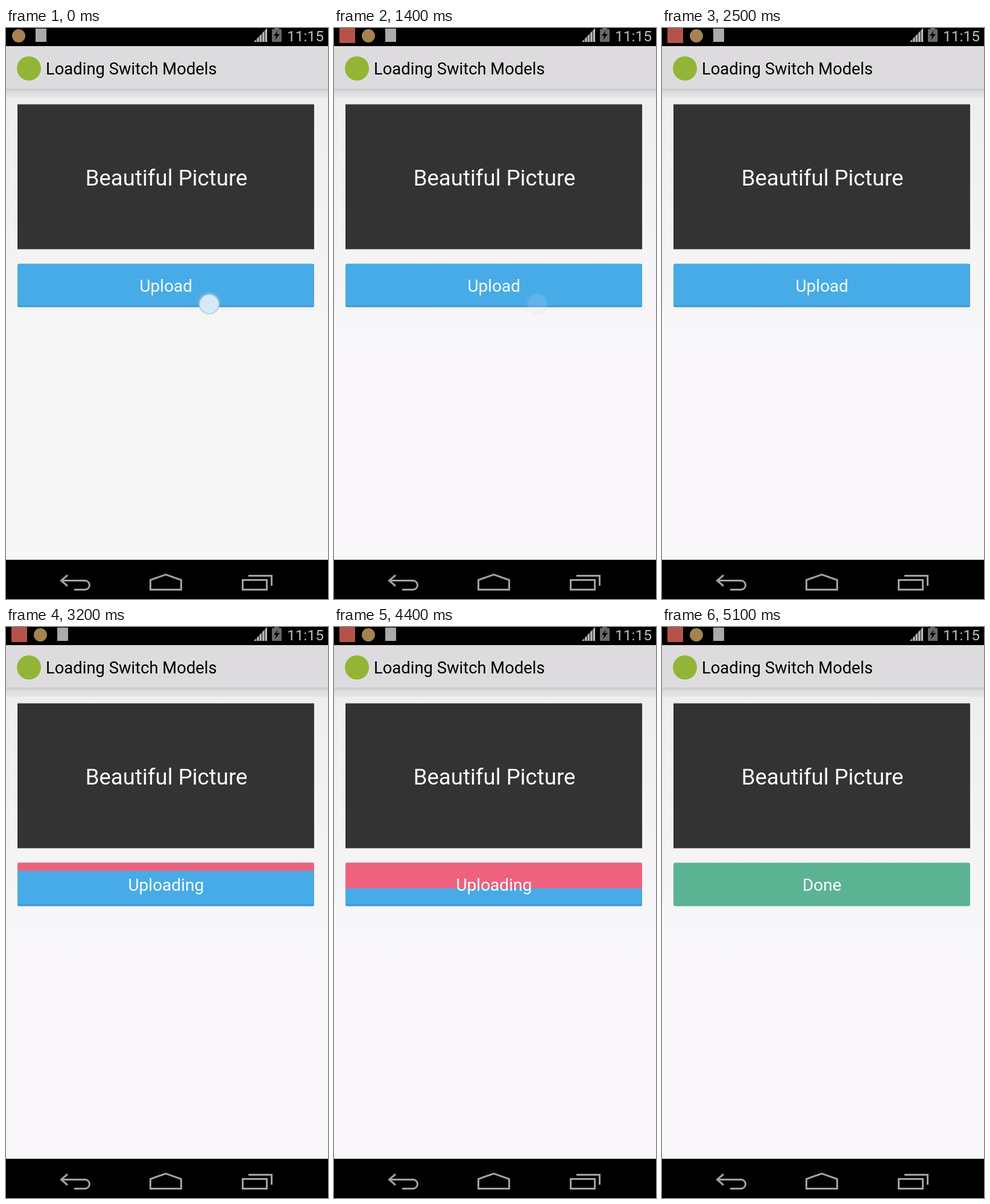
Recreate the animation shown at these times as an HTML page. Size 534 by 946 pixels, loop 6 s.

```html
<!DOCTYPE html>
<html lang="en">
<head>
<meta charset="utf-8">
<title>Upload button</title>
<style>
html, body { margin: 0; width: 100%; height: 100%; overflow: hidden; background: #f7f7f7; }
svg { display: block; width: 100%; height: 100%; }
text { font-family: Roboto, "Noto Sans", sans-serif; }
.nav { fill: none; stroke: #a2a2a2; stroke-width: 3; }
</style>
</head>
<body>
<svg viewBox="0 0 534 946">
  <defs>
    <linearGradient id="shade" x2="0" y2="1">
      <stop offset="0" stop-color="#dbdadc"/>
      <stop offset="1" stop-color="#e8e7e9"/>
    </linearGradient>
    <linearGradient id="haze" x2="0" y2="1">
      <stop offset="0" stop-color="#eeedef"/>
      <stop offset="1" stop-color="#eeedef" stop-opacity="0"/>
    </linearGradient>
    <radialGradient id="glow">
      <stop offset=".78" stop-color="#7fb9e2" stop-opacity=".6"/>
      <stop offset="1" stop-color="#a9cfea" stop-opacity="0"/>
    </radialGradient>
    <clipPath id="round"><rect x="19" y="390.5" width="492" height="72" rx="3"/></clipPath>
  </defs>

  <!-- page and title bar -->
  <rect id="page" y="30" width="534" height="851"/>
  <rect y="115" width="534" height="425" fill="url(#haze)"/>
  <rect id="bar" y="30" width="534" height="70"/>
  <rect y="100" width="534" height="4" fill="#cfced0"/>
  <rect y="104" width="534" height="12" fill="url(#shade)"/>
  <circle cx="38" cy="67" r="20" fill="#93b536"/>
  <text x="66" y="77" font-size="27.4">Loading Switch Models</text>

  <!-- status bar -->
  <rect width="534" height="30"/>
  <rect id="alert" x="9" y="0" width="26" height="25" fill="#b5534a"/>
  <g id="icons">
    <circle cx="21" cy="13" r="11" fill="#a4834e"/>
    <rect x="49" y="1" width="18" height="22" fill="#aaa"/>
  </g>
  <path d="M411 23L433 0V23Z" fill="#b9b9b9"/>
  <path d="M415.500 0V24M420 0V24M424.500 0V24M429 0V24" stroke="#000"/>
  <path d="M445 0h8v2h4v21h-16v-21h4z" fill="#686868"/>
  <path d="M451 4L444 13h4l-2 7 8-10h-5z"/>
  <text x="527" y="21.5" font-size="24.5" text-anchor="end" fill="#bdbdbd">11:15</text>

  <!-- picture -->
  <rect x="19" y="126.5" width="492" height="240" fill="#333"/>
  <text x="266" y="261" font-size="36.6" text-anchor="middle" fill="#f9f9f9">Beautiful Picture</text>

  <!-- button -->
  <g clip-path="url(#round)">
    <rect id="face" x="19" y="390" width="492" height="73"/>
    <rect id="fill" x="19" y="390" width="492" fill="#ee627e"/>
    <rect id="edge" x="19" y="459.5" width="492" height="3" fill="#4398d0"/>
  </g>
  <text id="label" x="265.3" y="437" font-size="28" text-anchor="middle" fill="#f8fbfd"></text>

  <g id="touch">
    <circle cx="337" cy="456" r="20" fill="url(#glow)"/>
    <circle cx="337" cy="457.5" r="16" fill="#d5e9f7" stroke="#b9ccd9" stroke-width="1.5"/>
  </g>

  <!-- navigation bar -->
  <rect y="881" width="534" height="65"/>
  <g class="nav">
    <path d="M102 906.5L91.500 915.500L102 924.500M91.500 915.500H131A7.500 7.500 0 0 1 131 930.500H113"/>
    <path d="M239.500 930.500V914.500L265 905.500L290.500 914.500V930.500Z"/>
    <path d="M392.500 914.500H432.500V930.500H392.500ZM402 907.500H440.500V924"/>
  </g>
</svg>
<script>
const LOOP = 6000;
const FULL = 72;
// [start ms, value]
const progress = [[0, 0], [2900, 10], [3200, 20], [3500, 30], [3700, 40], [4100, 50], [4400, 60], [5000, 80], [5100, 100]];
const touchAlpha = [[0, 1], [1300, .6], [1400, .18], [2300, 0]];

const el = id => document.getElementById(id);
const set = (id, name, value) => el(id).setAttribute(name, value);
const at = (steps, t) => steps.filter(([start]) => start <= t).pop()[1];

function draw(t) {
  const p = at(progress, t);
  const done = p === 100;
  const alerted = t >= 1300;

  set("page", "fill", alerted ? "#f9f7fa" : "#f7f7f7");
  set("bar", "fill", alerted ? "#dddbde" : "#dcdcdf");
  set("alert", "opacity", alerted ? 1 : 0);
  set("icons", "transform", `translate(${alerted ? 36 : 0} 0)`);

  set("face", "fill", done ? "#5cb394" : "#47abe7");
  set("fill", "height", done ? 0 : Math.floor(FULL * p / 100));
  set("edge", "opacity", done ? 0 : 1);
  el("label").textContent = done ? "Done" : p ? "Uploading" : "Upload";
  set("touch", "opacity", at(touchAlpha, t));
}

function tick() {
  draw(performance.now() % LOOP);
  requestAnimationFrame(tick);
}
tick();
</script>
</body>
</html>
```
